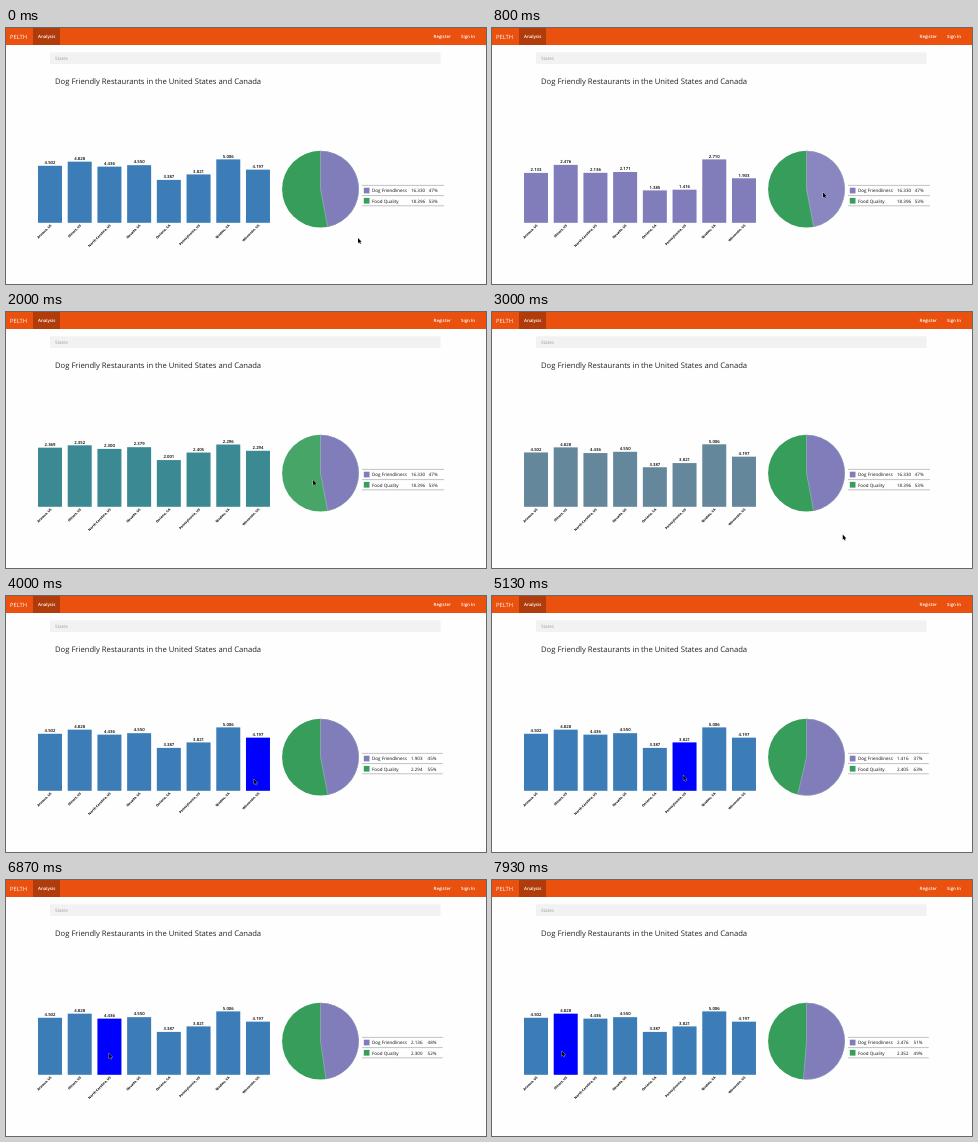
An HTML page for the animation above (8 s loop, 480x256 px).

```html
<!DOCTYPE html>
<html lang="en">
<head>
<meta charset="utf-8">
<title>Dashboard</title>
<style>
  html, body { margin: 0; width: 100%; height: 100%; overflow: hidden; background: #fefefe; }
  svg { display: block; width: 480px; height: 256px; text-rendering: geometricPrecision; }
  text { font: 500 4.5px "Open Sans", "Noto Sans", sans-serif; fill: #111; white-space: pre; }
  .nav text { fill: #fff; font-weight: 600; font-size: 4.4px; }
  .nav .brand { font-size: 5.8px; font-weight: 500; }
  .crumb { fill: #9c9c9c; }
  .title { font-size: 7.66px; fill: #222; }
  .value { font-size: 4.25px; font-weight: 600; text-anchor: middle; fill: #000; }
  .place { font-size: 3.3px; font-weight: 700; text-anchor: end; fill: #000; }
</style>
</head>
<body>
<svg viewBox="0 0 480 256">
  <g class="nav">
    <rect width="480" height="17" fill="#ea500e"/>
    <rect x="27" width="27" height="17" fill="#b03c0b"/>
    <text class="brand" x="4" y="10.8">PELTH</text>
    <text x="32" y="10.3">Analysis</text>
    <text x="427.6" y="10.3">Register</text>
    <text x="455" y="10.3">Sign In</text>
  </g>
  <rect x="44" y="24.3" width="390.6" height="11.7" rx="1.2" fill="#f2f2f2"/>
  <text class="crumb" x="49" y="31.8">States</text>
  <text class="title" x="49" y="56.2">Dog Friendly Restaurants in the United States and Canada</text>
  <g id="chart"></g>
  <g id="pie"></g>
  <g id="legend"></g>
  <path id="cursor" d="M0 0V5.2L1.2 4.1L2 6L2.9 5.6L2.1 3.8H3.7Z" stroke="#fff" stroke-width=".5" paint-order="stroke"/>
</svg>
<script>
const LOOP = 8000, STEP = 200 / 3, FADE = 500;
const LEFT = 32, BASE = 194.8, TALL = 63.4, BAR_W = 24, PITCH = 29.71;
const PIE = { x: 314.5, y: 161.2, r: 38.4 };
const BLUE = [60, 125, 183], WHITE = [255, 255, 255];
const COLORS = { dog: [128, 125, 186], food: [54, 157, 90] };

const places = ["Arizona, US", "Illinois, US", "North Carolina, US", "Nevada, US",
  "Ontario, CA", "Pennsylvania, US", "Quebec, CA", "Wisconsin, US"];
const dog = [2.133, 2.476, 2.136, 2.171, 1.3854, 1.416, 2.71, 1.903];
const food = [2.369, 2.352, 2.3, 2.379, 2.0014, 2.405, 2.296, 2.294];
const series = { all: dog.map((d, i) => d + food[i]), dog, food };

const $ = id => document.getElementById(id);
const sum = list => list.reduce((a, b) => a + b, 0);
const clamp = v => Math.max(0, Math.min(1, v));
const mix = (a, b, p) => a.map((v, i) => v + (b[i] - v) * p);
const cubic = p => p < .5 ? 4 * p ** 3 : 1 - 4 * (1 - p) ** 3;
const smooth = p => p * p * (3 - 2 * p);
const rgb = c => `rgb(${c.map(Math.round)})`;
const isBar = hover => typeof hover === "number";

function set(node, attrs) {
  for (const key in attrs) node.setAttribute(key, attrs[key]);
}
function add(parent, tag, attrs, text = "") {
  const node = document.createElementNS("http://www.w3.org/2000/svg", tag);
  set(node, attrs);
  node.textContent = text;
  return $(parent).appendChild(node);
}

// Pointer stops as [time, x, y]: round the pie, then bar by bar to the left
const path = [[70, 352, 210], [150, 366, 202], [400, 331, 164.5], [1070, 331, 164.5],
  [1450, 316, 224], [1570, 316, 224], [2000, 307, 168], [2500, 307, 168],
  [2750, 335, 172], [3150, 358, 246], [3670, 262, 222]];
const rest = n => [LEFT + (7 - n) * PITCH + BAR_W / 2 - 4, 183 - 2 * n];
path.push([4000, ...rest(0)]);
for (let n = 1; n <= 6; n++) {
  const t = 3880 + 580 * n;
  path.push([t - 150, ...rest(n - 1)], [t + 150, ...rest(n)]);
}

function pointer(t) {
  const i = path.findIndex(k => k[0] > t);
  if (i < 0) return path.at(-1);
  if (!i) return path[0];
  const a = path[i - 1], b = path[i];
  return mix(a, b, smooth((t - a[0]) / (b[0] - a[0])));
}

// What lies under the pointer: a slice name, a bar index or nothing
function hit([, x, y]) {
  const dx = x - PIE.x, dy = y - PIE.y, turn = 2 * Math.PI;
  if (Math.hypot(dx, dy) < PIE.r)
    return (Math.atan2(dx, -dy) + turn) % turn < pieTarget(null)[0] * turn ? "dog" : "food";
  const edge = LEFT + BAR_W - PITCH;
  return y < BASE && x < edge + 8 * PITCH ? Math.floor((x - edge) / PITCH) : null;
}

// Bar heights followed by the fill colour
function barTarget(hover) {
  const data = series[hover] || series.all, top = Math.max(...data);
  return [...data.map(v => v / top * TALL), ...(COLORS[hover] || BLUE)];
}
function counts(hover) {
  return isBar(hover) ? { dog: dog[hover], food: food[hover] } : { dog: sum(dog), food: sum(food) };
}
function pieTarget(hover) {
  const c = counts(hover);
  return [c.dog / (c.dog + c.food)];
}

const hovers = [{ start: -FADE, hover: null }];
for (let t = 0; t < LOOP; t += 10) {
  const hover = hit(pointer(t));
  if (hover !== hovers.at(-1).hover) hovers.push({ start: t, hover });
}

// Each hover starts a new transition from wherever the last one had got to
function follow(target, t) {
  let value = target(null);
  hovers.forEach(({ start, hover }, i) => {
    if (start > t) return;
    const end = Math.min(t, hovers[i + 1]?.start ?? LOOP);
    value = mix(value, target(hover), cubic(clamp((end - start) / FADE)));
  });
  return value;
}

const bars = places.map((place, i) => {
  const x = LEFT + i * PITCH, mid = x + BAR_W / 2;
  add("chart", "text", { class: "place", transform: `translate(${mid + 1.7} 197.6) rotate(-45)` }, place);
  return {
    rect: add("chart", "rect", { x, width: BAR_W }),
    label: add("chart", "text", { class: "value", x: mid })
  };
});
const slices = {
  food: add("pie", "circle", { cx: PIE.x, cy: PIE.y, r: PIE.r }),
  dog: add("pie", "path", { stroke: "#fff", "stroke-width": .4, "stroke-opacity": .6 })
};
const rules = add("legend", "path", { stroke: "#aaa", "stroke-width": .7 });
const rows = [["dog", "Dog Friendliness"], ["food", "Food Quality"]].map(([key, name], i) => {
  const y = 164.4 + i * 10.2;
  add("legend", "rect", { x: 357.8, y: y - 4.7, width: 5.7, height: 5.7, fill: rgb(COLORS[key]) });
  add("legend", "text", { x: 366, y }, name);
  return { key, count: add("legend", "text", { x: 405, y }), share: add("legend", "text", { y }) };
});

function draw(t) {
  const { hover } = hovers.findLast(h => h.start <= t);
  const state = follow(barTarget, t), fill = rgb(state.slice(-3));
  const data = series[hover] || series.all;
  bars.forEach(({ rect, label }, i) => {
    const y = BASE - state[i];
    set(rect, { y, height: state[i], fill: hover === i ? "#00f" : fill });
    set(label, { y: y - 1.7 });
    label.textContent = data[i].toFixed(3);
  });

  const [share] = follow(pieTarget, t), angle = share * 2 * Math.PI;
  const { x, y, r } = PIE;
  set(slices.dog, {
    d: `M${x} ${y}V${y - r}A${r} ${r} 0 ${+(share > .5)} 1 ${x + r * Math.sin(angle)} ${y - r * Math.cos(angle)}Z`
  });
  for (const key in slices)
    set(slices[key], { fill: rgb(mix(COLORS[key], WHITE, hover === key ? .08 : 0)) });

  const c = counts(hover), shift = isBar(hover) ? 1.2 : 0;
  rows.forEach(row => {
    row.count.textContent = c[row.key].toFixed(3);
    row.share.textContent = Math.round(100 * c[row.key] / (c.dog + c.food)) + "%";
    set(row.share, { x: 422.8 - shift });
  });
  set(rules, { d: [0, 1, 2].map(i => `M356 ${157.4 + i * 10.2}H${438 - shift}`).join("") });

  const [, px, py] = pointer(t);
  set($("cursor"), { transform: `translate(${px} ${py})` });
}

const began = performance.now();
function tick() {
  const t = (performance.now() - began) % LOOP;
  draw(Math.floor((t + 5) / STEP) * STEP % LOOP);
  requestAnimationFrame(tick);
}
tick();
</script>
</body>
</html>
```
